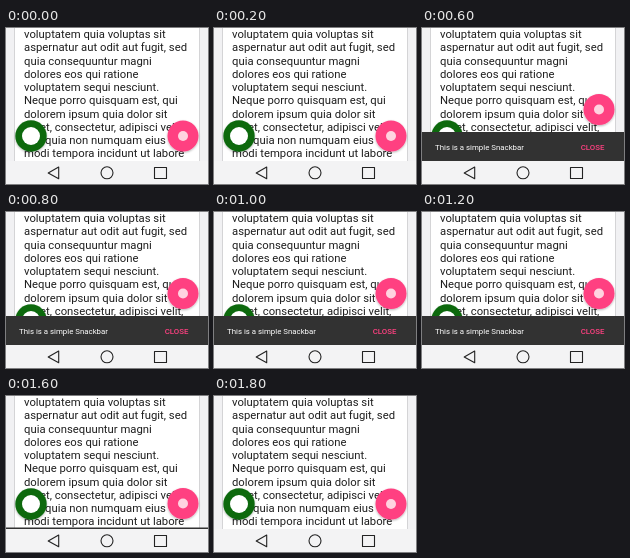
Recreate the animation shown at these times as an HTML page. Size 202 px wide and 156 px high, loop 1900 ms.

```html
<!DOCTYPE html>
<html lang="en">
<head>
<meta charset="utf-8">
<title>Snackbar</title>
<style>
  html, body { margin: 0; width: 100%; height: 100%; overflow: hidden; background: #f1f1f3; }
  svg { display: block; width: 202px; height: 156px; font-family: Roboto, sans-serif; }
  #copy { font-size: 11.3px; fill: #1e1e1e; }
  #bar text { font-size: 7.85px; fill: #fff; }
  #bar .action { font-weight: 500; fill: #ff4081; }
  .nav { fill: none; stroke: #222; stroke-width: 1.1; stroke-linejoin: round; }
</style>
</head>
<body>
<svg viewBox="0 0 202 156">
  <defs>
    <filter id="shade" x="-40%" y="-40%" width="180%" height="180%">
      <feDropShadow dx="0" dy="1" stdDeviation="1" flood-opacity=".3"/>
    </filter>
  </defs>
  <rect width="202" height="156" fill="#f1f1f3"/>
  <rect x="8" y="-4" width="186" height="150" fill="#d4d4d6"/>
  <rect x="9" y="-4" width="184" height="150" fill="#fff"/>
  <g id="copy"></g>
  <g filter="url(#shade)">
    <circle cx="25" cy="108" r="15.7" fill="#0b690e"/>
    <circle cx="25" cy="108" r="9" fill="#fff"/>
  </g>
  <g id="fab" filter="url(#shade)">
    <circle cx="177" cy="108" r="15.5" fill="#ff4081"/>
    <circle cx="177" cy="108" r="5" fill="#ffd3e0"/>
  </g>
  <g id="bar">
    <rect y="104" width="202" height="29" fill="#323232"/>
    <rect id="press" x="147.5" y="108" width="46" height="20" rx="1" fill="#424242"/>
    <g id="label">
      <text x="13" y="122">This is a simple Snackbar</text>
      <text class="action" x="158.7" y="122">CLOSE</text>
    </g>
  </g>
  <rect y="133" width="202" height="23" fill="#f3f3f4"/>
  <g class="nav">
    <path d="M52.7 139V150.7L42.2 144.9Z"/>
    <circle cx="101" cy="144.8" r="6"/>
    <rect x="148.5" y="139.5" width="12" height="11"/>
  </g>
</svg>
<script>
const $ = id => document.getElementById(id);
const lines = [
  'voluptatem quia voluptas sit',
  'aspernatur aut odit aut fugit, sed',
  'quia consequuntur magni',
  'dolores eos qui ratione',
  'voluptatem sequi nesciunt.',
  'Neque porro quisquam est, qui',
  'dolorem ipsum quia dolor sit',
  'amet, consectetur, adipisci velit,',
  'sed quia non numquam eius',
  'modi tempora incidunt ut labore'
];
$('copy').innerHTML = lines
  .map((s, i) => `<text x="18" y="${10.2 + 13.25 * i}">${s}</text>`).join('');

const LOOP = 1900;
// time, bar offset, FAB lift, label opacity, button pressed
const steps = [
  [0, 29, 0, 0, 0],
  [400, 13, 15.5, 0, 0],
  [500, 1, 25.5, 0.7, 0],
  [600, 0, 26.5, 1, 0],
  [1400, 3, 25, 1, 1],
  [1500, 17, 11, 0.4, 1],
  [1600, 27.5, 0.5, 0, 0],
  [1700, 29, 0, 0, 0]
];

const start = performance.now();
function draw(now) {
  const t = Math.max(0, now - start) % LOOP;
  const [, drop, lift, alpha, pressed] = steps.findLast(s => s[0] <= t);
  $('bar').setAttribute('transform', `translate(0 ${drop})`);
  $('fab').setAttribute('transform', `translate(0 ${-lift})`);
  $('label').setAttribute('opacity', alpha);
  $('press').setAttribute('opacity', pressed * alpha);
  requestAnimationFrame(draw);
}
draw(start);
</script>
</body>
</html>
```
